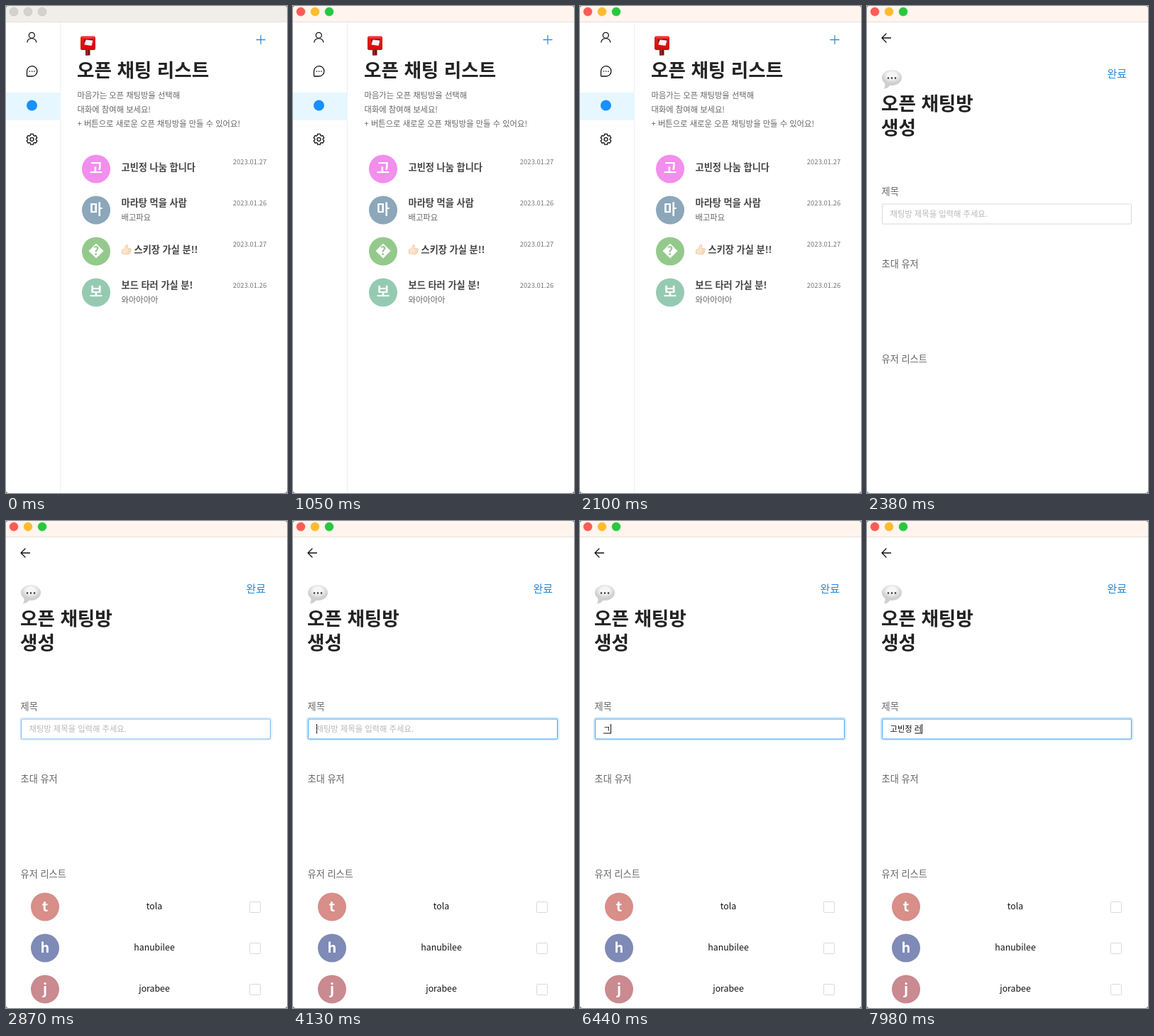
These frames come from a looping animation (396 px wide and 686 px high, 8 s). An HTML page:

```html
<!DOCTYPE html>
<html lang="ko">
<head>
<meta charset="utf-8">
<style>
html, body { margin: 0; width: 100%; height: 100%; overflow: hidden; background: #777; }
svg { display: block; width: 396px; height: 686px; background: #fff; border-radius: 4px; }
text { font-family: "Noto Sans CJK KR", "Noto Sans KR", "Noto Sans CJK", "Noto Sans", sans-serif; white-space: pre; }
.line { fill: none; stroke: #111; stroke-width: 1.3; stroke-linecap: round; stroke-linejoin: round; }
</style>
</head>
<body>
<svg viewBox="0 0 396 686">
  <defs>
    <linearGradient id="red" x2="0" y2="1"><stop stop-color="#e8201c"/><stop offset="1" stop-color="#cf0a10"/></linearGradient>
    <radialGradient id="bubble" cy=".35"><stop offset=".4" stop-color="#f6f6f6"/><stop offset="1" stop-color="#cfcfcf"/></radialGradient>
  </defs>
  <rect id="bar" width="396" height="22"/>
  <path d="M0 22.500H396" stroke="#e3dfdc"/>
  <g id="lights"></g>

  <g id="list">
    <path d="M76.500 23V686" stroke="#f0f0f0"/>
    <path d="M0 122H77V161H0Z" fill="#e6f7ff"/>
    <g class="line">
      <circle cx="36.300" cy="41.300" r="4"/>
      <path d="M29.800 50.800A6.600 6.200 0 0 1 42.800 50.800"/>
      <path d="M30.300 99Q29.500 99 29.500 98.200V92A7.200 7.200 0 1 1 36.700 99Z"/>
      <path id="gear"/>
      <circle cx="36.500" cy="187.800" r="2.500"/>
    </g>
    <path d="M33.500 92h.01M36.700 92h.01M39.900 92h.01" stroke="#111" stroke-width="1.700" stroke-linecap="round"/>
    <circle cx="36.500" cy="140" r="7.500" fill="#1890ff"/>
    <path d="M352.500 47.500H365.500M359 41V54" stroke="#2f90de" stroke-width="1.300"/>

    <path d="M112 60H118.500V69.500H112Z" fill="#6d1212"/>
    <path d="M113 60H115.500V69.500H113Z" fill="#a8221e"/>
    <rect x="105" y="42.500" width="21" height="19.500" rx="2.500" fill="url(#red)"/>
    <path d="M107 44.300H124" stroke="#f5564e"/>
    <path d="M110 47H123V50H110Z" fill="#6a0a0c"/>
    <path d="M112.500 47.500L122.500 48.500L120.500 56L110.500 54.500Z" fill="#f8f0f0"/>

    <path d="M163.500 343.500L166.500 342.500L169.500 336.500Q172 335.800 171.700 338.500L171 341.500H175.500Q177 342 176 343.500Q177 344.800 175.500 345.800Q176 347.300 174.500 348Q174 349.600 172 349.600H167.500L163.500 348.800Z" fill="#fde3c8" stroke="#e6bf98" stroke-width=".7"/>
    <path d="M171.500 343.700H176M171.500 345.900H175.500M171.500 348H174.500" stroke="#e6bf98" stroke-width=".6"/>
  </g>

  <g id="form">
    <path class="line" d="M33.500 45H21M27 39L21 45L27 51"/>
    <path d="M25 108Q26.500 113 23.500 116.500Q30 116 33 111Z" fill="#cecece"/>
    <ellipse cx="35" cy="101" rx="14" ry="11" fill="url(#bubble)"/>
    <path d="M30 101.500h.01M35 101.500h.01M40 101.500h.01" stroke="#333" stroke-width="2.600" stroke-linecap="round"/>
    <rect id="glow" x="20" y="277.500" width="354" height="30.500" rx="3" fill="none" stroke="#1890ff" stroke-width="2.500"/>
    <rect id="box" x="21.500" y="279" width="351" height="28" rx="1.500" fill="#fff"/>
    <path id="under" stroke="#111"/>
    <path id="caret" stroke="#111"/>
  </g>
  <g id="users"></g>
</svg>
<script>
const $ = id => document.getElementById(id);
const NS = "http://www.w3.org/2000/svg";

function add(parent, tag, attrs, content = "") {
  const el = document.createElementNS(NS, tag);
  for (const k in attrs) el.setAttribute(k, attrs[k]);
  el.textContent = content;
  return parent.appendChild(el);
}
const text = (parent, str, x, y, size, fill, weight = 400, anchor = "start") =>
  add(parent, "text", { x, y, fill, "font-size": size, "font-weight": weight, "text-anchor": anchor }, str);

function avatar(parent, x, y, fill, letter) {
  add(parent, "circle", { cx: x, cy: y, r: 20, fill });
  if (letter) text(parent, letter, x, y + 6.5, 20, "#fff", 700, "middle");
}

const lights = ["#fc5b57", "#fdbc2f", "#28c840"].map((on, i) =>
  ({ on, el: add($("lights"), "circle", { cx: 11 + 20 * i, cy: 8, r: 6, "stroke-width": .6 }) }));

// Gear with six teeth
let gear = "";
for (let k = 0; k < 6; k++)
  for (const [deg, r] of [[-23, 5.8], [-15, 7.6], [15, 7.6], [23, 5.8]]) {
    const a = (k * 60 - 90 + deg) * Math.PI / 180;
    gear += (gear ? "L" : "M") + (36.5 + r * Math.cos(a)) + " " + (187.8 + r * Math.sin(a));
  }
$("gear").setAttribute("d", gear + "Z");

// Room list page
const list = $("list");
text(list, "오픈 채팅 리스트", 100, 99.5, 26.6, "#222", 700);
["마음가는 오픈 채팅방을 선택해", "대화에 참여해 보세요!", "+ 버튼으로 새로운 오픈 채팅방을 만들 수 있어요!"]
  .forEach((s, i) => text(list, s, 100.5, 130 + 20 * i, 11.3, "#666"));
[
  ["고", "#f28eec", "고빈정 나눔 합니다", "", 27],
  ["마", "#8ba7b9", "마라탕 먹을 사람", "배고파요", 26],
  ["", "#94c98c", "스키장 가실 분!!", "", 27],
  ["보", "#95cab1", "보드 타러 가실 분!", "와아아아아", 26]
].forEach(([letter, color, title, sub, day], i) => {
  const y = 229.5 + 58 * i;
  avatar(list, 127, y, color, letter);
  if (!letter) {
    add(list, "path", { d: `M127 ${y - 11}l10.500 10.500l-10.500 10.500l-10.500 -10.500Z`, fill: "#fff" });
    text(list, "?", 127, y + 5.5, 17, color, 700, "middle");
  }
  text(list, title, letter ? 162.5 : 180.5, y + (sub ? -5.5 : 2), 13.2, "#444", 700);
  text(list, sub, 162.5, y + 14.8, 11.3, "#666");
  text(list, "2023.01." + day, 367.3, y - 6.3, 9.5, "#777", 400, "end");
});

// New room page
const form = $("form");
text(form, "오픈 채팅방", 20, 147, 26.6, "#222", 700);
text(form, "생성", 20, 181, 26.6, "#222", 700);
text(form, "완료", 338.5, 101, 15, "#2389dc");
text(form, "제목", 20.5, 266, 13.2, "#666");
text(form, "초대 유저", 20.5, 367.5, 13.2, "#666");
text(form, "유저 리스트", 20.5, 502, 13.2, "#666");
const hint = text(form, "채팅방 제목을 입력해 주세요.", 32.5, 296.5, 11.3, "#b8b8b8");
const field = text(form, "", 32.5, 296.5, 11.3, "#111");
[["tola", "#d88e89"], ["hanubilee", "#7f8ab6"], ["jorabee", "#c98a90"]].forEach(([name, color], i) => {
  const y = 543.5 + 58 * i, g = $("users");
  avatar(g, 55, y, color, name[0]);
  text(g, name, 209, y + 3.5, 12.3, "#111", 400, "middle");
  add(g, "rect", { x: 343.5, y: y - 7, width: 15, height: 15, rx: 1, fill: "#fff", stroke: "#d9d9d9" });
});

// [time, committed text, syllable being composed]
const typing = [
  [0, ""], [4340, "r"], [4410, "rh"], [4480, "rhq"], [4620, "rhql"], [4690, "rhqls"],
  [5390, "rhql"], [5530, "rhq"], [5670, "rh"], [5810, "r"], [5950, ""],
  [6440, "", "ㄱ"], [6930, "", "고"], [7000, "", "곱"], [7070, "고", "비"], [7140, "고", "빈"],
  [7280, "고빈", "ㅈ"], [7350, "고빈", "저"], [7490, "고빈", "정"], [7630, "고빈정\u00a0"],
  [7770, "고빈정\u00a0", "ㄹ"], [7980, "고빈정\u00a0", "러"]
];
const blinks = [3150, 3640, 4130, 4970, 5250];

function widthOf(str) {
  field.textContent = str;
  return str ? field.getComputedTextLength() : 0;
}
const show = (el, on) => el.style.display = on ? "" : "none";

function draw(t) {
  const active = t >= 910, open = t >= 2380;
  $("bar").setAttribute("fill", active ? "#fff5ee" : "#f1ede9");
  for (const { on, el } of lights) {
    el.setAttribute("fill", active ? on : "#d5d1ce");
    el.setAttribute("stroke", active ? on : "#c6c2bf");
  }
  show(list, !open);
  show(form, open);
  show($("users"), t >= 2520);
  if (!open) return;

  const p = Math.min(1, Math.max(0, (t - 2760) / 300));
  const focus = 1 - (1 - p) ** 2;
  const mix = (a, b) => a + (b - a) * focus;
  $("box").setAttribute("stroke", `rgb(${mix(217, 72)},${mix(217, 164)},${mix(217, 238)})`);
  $("glow").setAttribute("stroke-opacity", .2 * focus);

  const [, done, part = ""] = typing.findLast(s => t >= s[0]);
  const from = 33 + widthOf(done), to = 33 + widthOf(done + part);
  show(hint, !(done + part));
  $("under").setAttribute("d", part ? `M${from} 299H${to}` : "");
  $("caret").setAttribute("d", `M${Math.floor(to) + .5} 286V299.500`);
  show($("caret"), blinks.filter(b => t >= b).length % 2);
}

const start = performance.now();
function tick() {
  draw((performance.now() - start) % 8000);
  requestAnimationFrame(tick);
}
tick();
</script>
</body>
</html>
```
